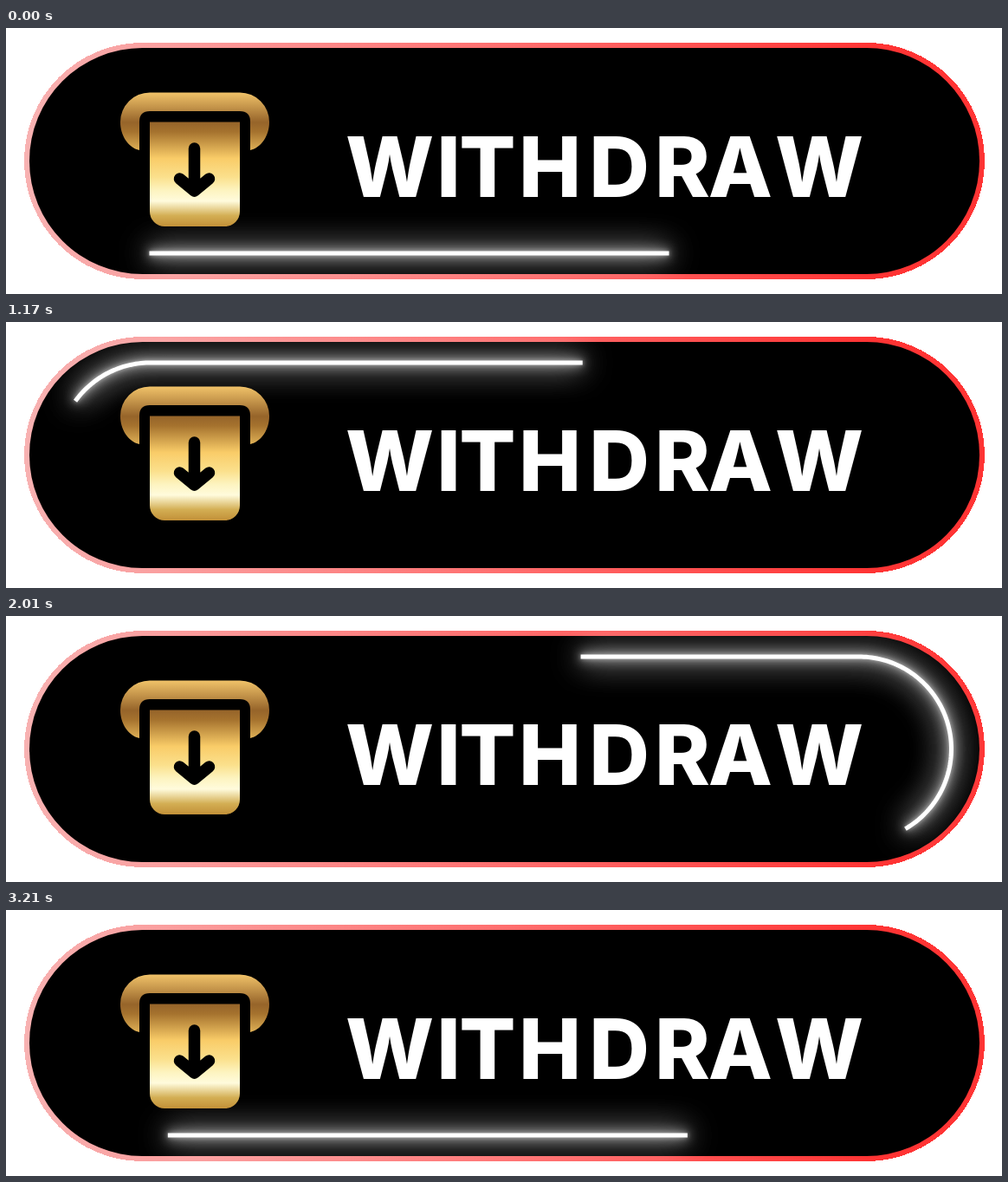
These frames come from a looping animation (1150 by 307 pixels, 3.24 s). An HTML page:

```html
<!DOCTYPE html>
<html lang="en">
<head>
<meta charset="utf-8">
<title>Withdraw button</title>
<style>
  html, body { margin: 0; width: 100%; height: 100%; overflow: hidden; background: #fff; }
  svg { display: block; width: 100%; height: 100%; }
  text { font: 800 96.5px Inter, "Open Sans", sans-serif; font-optical-sizing: none; fill: #fff; }
  .beam path { fill: none; stroke: #fff; stroke-width: 5; }
</style>
</head>
<body>
<svg viewBox="0 0 1150 307" xmlns="http://www.w3.org/2000/svg">
  <defs>
    <linearGradient id="rim" gradientUnits="userSpaceOnUse" x1="21" y1="0" x2="1130" y2="0">
      <stop offset="0" stop-color="#f8b2b2"/>
      <stop offset=".5" stop-color="#ff6e6e"/>
      <stop offset=".88" stop-color="#ff3434"/>
      <stop offset="1" stop-color="#ff3434"/>
    </linearGradient>
    <linearGradient id="gold" gradientUnits="userSpaceOnUse" x1="0" y1="75" x2="0" y2="229">
      <stop offset="0" stop-color="#efc168"/>
      <stop offset=".22" stop-color="#96642a"/>
      <stop offset=".29" stop-color="#a5722e"/>
      <stop offset=".49" stop-color="#f9cc68"/>
      <stop offset=".63" stop-color="#fbe08c"/>
      <stop offset=".73" stop-color="#fdf4c0"/>
      <stop offset=".81" stop-color="#fffbdc"/>
      <stop offset=".92" stop-color="#d3ae53"/>
      <stop offset="1" stop-color="#c29038"/>
    </linearGradient>
    <filter id="glow" filterUnits="userSpaceOnUse" x="0" y="0" width="1150" height="307" color-interpolation-filters="sRGB">
      <feGaussianBlur in="SourceGraphic" stdDeviation="2.5"/>
      <feComponentTransfer result="near"><feFuncA type="linear" slope=".5"/></feComponentTransfer>
      <feGaussianBlur in="SourceGraphic" stdDeviation="7" result="mid"/>
      <feGaussianBlur in="SourceGraphic" stdDeviation="18" result="far"/>
      <feMerge>
        <feMergeNode in="far"/>
        <feMergeNode in="far"/>
        <feMergeNode in="mid"/>
        <feMergeNode in="near"/>
      </feMerge>
    </filter>
    <clipPath id="pill"><rect x="21" y="17" width="1109" height="273" rx="136.5"/></clipPath>
  </defs>

  <rect x="21" y="17" width="1109" height="273" rx="136.5" fill="url(#rim)" shape-rendering="crispEdges"/>
  <rect x="27" y="23" width="1097" height="261" rx="130.5"/>

  <g class="beam" clip-path="url(#pill)">
    <g filter="url(#glow)"><path class="run"/></g>
    <path class="run"/>
  </g>

  <g fill="url(#gold)">
    <path d="M154 141C141 138 132 124 132 108.5A34 34 0 0 1 166 74.500H270A34 34 0 0 1 304 108.500C304 124 295 138 282 141V108Q282 96 270 96H166Q154 96 154 108Z"/>
    <path d="M166 108.500H270V212A17 17 0 0 1 253 229H183A17 17 0 0 1 166 212Z"/>
  </g>
  <path d="M217.500 139V187M200.500 174L217.500 188L234.500 174" fill="none" stroke="#000" stroke-width="13.500" stroke-linecap="round" stroke-linejoin="round"/>

  <text x="443 511 556 628 708 781 848 939" y="195" text-anchor="middle">WITHDRAW</text>
</svg>
<script>
  const LOOP = 3240, STEP = 30, BEAM = 600;
  const LEFT = 166.5, RIGHT = 985, TOP = 47, BOTTOM = 260;
  const R = (BOTTOM - TOP) / 2, MID = TOP + R;
  const SIDE = RIGHT - LEFT, ARC = Math.PI * R, LAP = 2 * (SIDE + ARC);
  const runs = document.querySelectorAll(".run");

  // Point at a distance along the track, clockwise from the lower left corner.
  function pointAt(dist) {
    let d = ((dist % LAP) + LAP) % LAP;
    if (d < ARC) return [LEFT - R * Math.sin(d / R), MID + R * Math.cos(d / R)];
    d -= ARC;
    if (d < SIDE) return [LEFT + d, TOP];
    d -= SIDE;
    if (d < ARC) return [RIGHT + R * Math.sin(d / R), MID - R * Math.cos(d / R)];
    return [RIGHT - (d - ARC), BOTTOM];
  }

  function beamPath(head) {
    const count = 200, points = [];
    for (let i = 0; i <= count; i++) {
      points.push(pointAt(head - BEAM * (1 - i / count)).map(v => v.toFixed(2)).join(" "));
    }
    return "M" + points.join("L");
  }

  function draw(ms) {
    const t = Math.floor((ms % LOOP) / STEP) * STEP;
    const d = beamPath(LEFT - 165.5 + LAP * t / LOOP);
    runs.forEach(run => run.setAttribute("d", d));
  }

  const start = performance.now();
  function tick() {
    draw(performance.now() - start);
    requestAnimationFrame(tick);
  }
  draw(0);
  requestAnimationFrame(tick);
</script>
</body>
</html>
```
